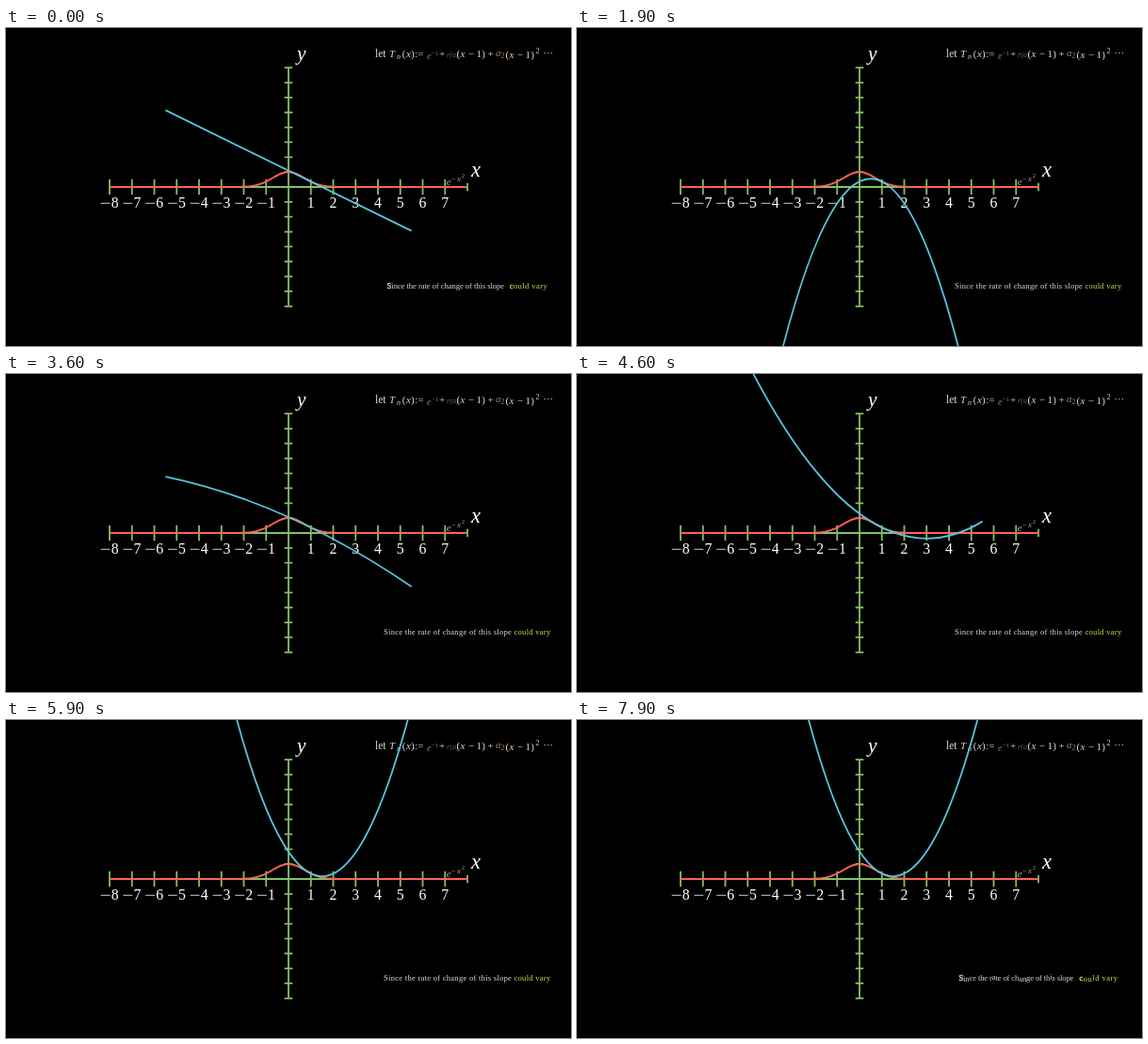
These frames come from a looping animation (600 px wide and 338 px high, 8000 ms). An HTML page:

```html
<!DOCTYPE html>
<html lang="en">
<head>
<meta charset="utf-8">
<title>Quadratic term</title>
<style>
  html, body { margin: 0; width: 100%; height: 100%; overflow: hidden; background: #000; }
  svg { display: block; width: 600px; height: 338px; }
  text { font-family: "Liberation Serif", serif; white-space: pre; }
  path { fill: none; }
</style>
</head>
<body>
<svg id="stage" viewBox="0 0 600 338"></svg>
<script>
const LOOP = 8000, STEP = 100;
const OX = 300, OY = 169, UX = 23.75, UY = 15.85;
const GREEN = '#83c167', RED = '#fc6255', BLUE = '#58c4dd', PALE = '#dadada';
const E1 = Math.exp(-1), SLOPE = -2 * E1, REACH = 5.5;

// each move starts PERIOD after the one before and lasts RUN
const FIRST = 253, PERIOD = 1603, RUN = 1015, WORDS_OUT = 7690;
const COEFS = [0, -2 * E1, -0.1 * E1, 0.5 * E1, 2 * E1];

const stage = document.getElementById('stage');
const px = x => OX + x * UX;
const py = y => OY - y * UY;

function add(tag, attrs, parent = stage) {
  const el = document.createElementNS('http://www.w3.org/2000/svg', tag);
  for (const k in attrs) el.setAttribute(k, attrs[k]);
  return parent.appendChild(el);
}
function label(x, y, size, str, fill = PALE, italic = false, anchor = 'start') {
  const el = add('text', {
    x, y, fill, 'font-size': size, 'text-anchor': anchor,
    'font-style': italic ? 'italic' : 'normal'
  });
  el.textContent = str;
  return el;
}
const stroke = (d, color, width) => add('path', { d, stroke: color, 'stroke-width': width });

function smooth(t) {
  const sig = v => 1 / (1 + Math.exp(-v)), e = sig(-5);
  t = Math.min(1, Math.max(0, t));
  return (sig(10 * (t - 0.5)) - e) / (1 - 2 * e);
}

function drawAxes() {
  let d = `M${px(-8)} ${OY}H${px(8)}M${OX} ${py(8)}V${py(-8)}`;
  for (let i = -8; i <= 8; i++) {
    d += `M${OX - 4.3} ${py(i)}h8.6`;
    if (!i) continue;
    const h = i === 8 ? 4.3 : 8.3;
    d += `M${px(i)} ${OY - h}v${2 * h}`;
  }
  stroke(d, GREEN, 1.8);
  for (let i = -8; i < 8; i++) {
    if (!i) continue;
    const x = px(i);
    label(i < 0 ? x + 5.7 : x, 190.8, 15.8, Math.abs(i), '#fff', false, 'middle');
    if (i < 0) stroke(`M${x - 9.3} 186.3h9.8`, '#fff', 0.8);
  }
  label(494, 157.6, 22.5, 'x', '#fff', true);
  label(309, 34.2, 21.5, 'y', '#fff', true);
}

function drawBell() {
  let d = '';
  for (let x = -8; x <= 8; x += 0.1) d += (d ? 'L' : 'M') + px(x).toFixed(2) + ' ' + py(Math.exp(-x * x)).toFixed(2);
  stroke(d + `L${px(8)} ${OY}`, RED, 1.9);
  const grey = '#b0a8a8';
  label(467.8, 166.8, 11, 'e', grey, true);
  label(473, 162.8, 8, '−', grey);
  label(479, 162.8, 8.5, 'x', grey, true);
  label(484, 159.4, 6, '2', grey);
}

function bracket(x, y) {
  label(x, y, 11, '(');
  label(x + 4, y, 11, 'x', PALE, true);
  label(x + 12.3, y, 11, '−');
  label(x + 21, y, 11, '1');
  label(x + 26.8, y, 11, ')');
}

function drawFormula() {
  const tan = '#a67f60', dim = '#80583f';
  label(392, 30.8, 11.6, 'let');
  label(407, 30.8, 11, 'T', PALE, true);
  label(415, 32.6, 8, 'n', PALE, true);
  label(420.7, 30.8, 11, '(');
  label(424.9, 30.8, 11, 'x', PALE, true);
  label(430, 30.8, 11, ')');
  label(434.2, 30.8, 11, ':=');
  label(447, 32.6, 9.5, 'e', tan, true);
  label(451.8, 29.4, 7, '−1', tan);
  label(460, 30.8, 11, '+');
  label(468, 30.8, 9, 'r', dim, true);
  label(471.3, 30.8, 8, '(a)', dim, true);
  bracket(478.5, 30.8);
  label(511.5, 30.8, 11, '+');
  label(520, 30, 11, 'a', tan, true);
  label(525.6, 32, 8, '2', tan);
  bracket(530.5, 32);
  label(562.5, 26.8, 8, '2');
  label(570.3, 30.4, 11, '···');
}

function makeWords(str, fill) {
  const el = label(0, 277, 8.6, '', fill);
  const head = add('tspan', { stroke: fill }, el), tail = add('tspan', {}, el);
  head.textContent = str[0];
  tail.textContent = str.slice(1);
  return { el, head, tail, n: str.length };
}
const wobble = i => Math.sin(i * 12.9 + 1) * 0.55;

// k = 0 is settled text, 1 is visibly loosened
function poseWords(w, x, gap, k) {
  w.el.setAttribute('x', x);
  w.el.setAttribute('letter-spacing', gap);
  const dy = [];
  for (let i = 1; i < w.n; i++) dy.push(((wobble(i) - (i > 1 ? wobble(i - 1) : 0)) * k).toFixed(2));
  w.tail.setAttribute('dy', dy.join(' '));
  w.head.setAttribute('stroke-width', 0.45 * k);
}

drawAxes();
drawBell();
drawFormula();
const lead = makeWords('Since the rate of change of this slope', PALE);
const tail = makeWords('could vary', '#d8d84a');
const curve = stroke('', BLUE, 1.8);

function coefAt(t) {
  const i = Math.min(COEFS.length - 2, Math.max(0, Math.floor((t - FIRST) / PERIOD)));
  return COEFS[i] + (COEFS[i + 1] - COEFS[i]) * smooth((t - FIRST - i * PERIOD) / RUN);
}

function render(t) {
  const a = coefAt(t);
  const f = x => E1 + SLOPE * (x - 1) + a * (x - 1) ** 2;
  const mid = f(-REACH) + REACH * (SLOPE + 2 * a * (-REACH - 1));
  curve.setAttribute('d', `M${px(-REACH)} ${py(f(-REACH))}Q${OX} ${py(mid)} ${px(REACH)} ${py(f(REACH))}`);

  const loose = 11 * (1 - smooth((t + RUN - FIRST) / RUN)) + 21 * smooth((t - WORDS_OUT) / RUN);
  const k = Math.max(0, loose);
  poseWords(lead, 401 + 4.7 * k, 0.24 - 0.4 * k, k);
  poseWords(tail, 539.5 - 6.3 * k, 0.24 + 0.2 * k, k);
}

function frame() {
  const t = performance.now() % LOOP;
  render(Math.floor(t / STEP) * STEP);
  requestAnimationFrame(frame);
}
frame();
</script>
</body>
</html>
```
